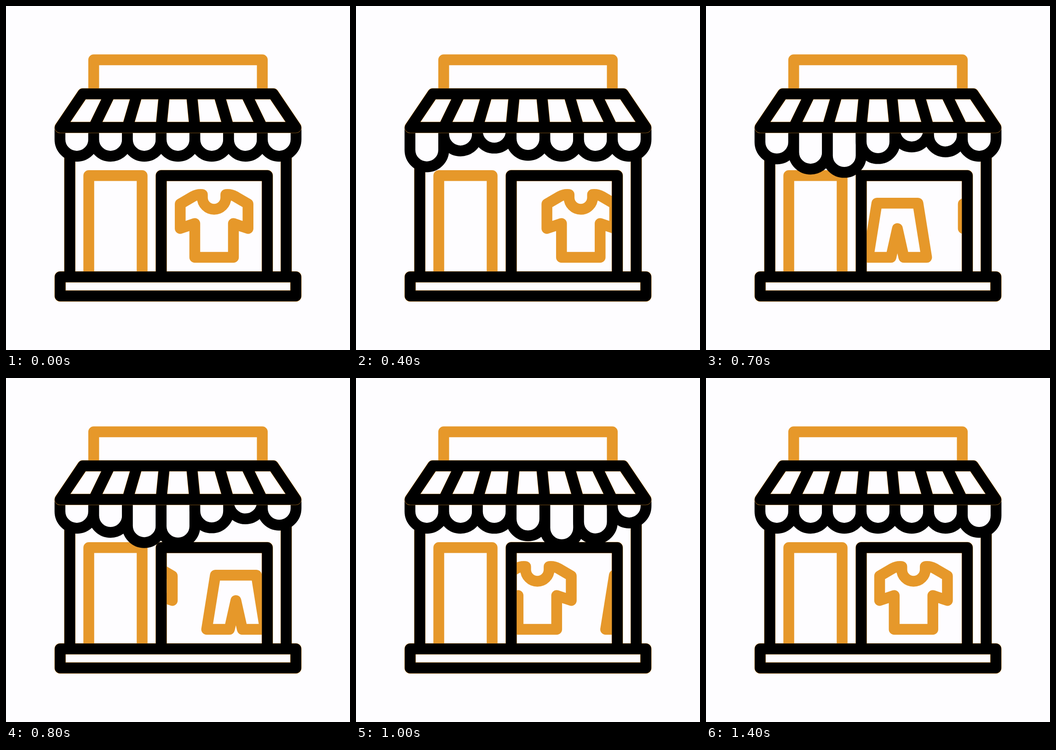
Recreate the animation shown at these times as an HTML page without scripts. Size 748 px wide and 748 px high, loop 1.5 s.

```html
<!DOCTYPE html>
<html lang="en">
<head>
<meta charset="utf-8">
<title>Clothes shop</title>
<style>
  @property --t { syntax: "<number>"; inherits: true; initial-value: 0; }

  html, body { margin: 0; height: 100%; overflow: hidden; background: #fefdff; }

  svg {
    display: block;
    width: 100%;
    height: 100%;
    fill: none;
    stroke-width: 23.5;
    stroke-linejoin: round;
    animation: clock 1500ms steps(15) -20ms infinite;
  }

  /* Clock in milliseconds, ten ticks per second */
  @keyframes clock { to { --t: 1500; } }

  .accent { stroke: #e6982a; }
  .ink { stroke: #000; }
  .fringe { stroke-width: 24.6; }

  /* Closed form of cubic-bezier(2/3, 0, 1/3, 1) */
  .rack {
    --q: calc((var(--t) - 740) / 6000);
    --r: sqrt(var(--q) * var(--q) + 1 / 1728);
    --s: calc(0.5 + pow(var(--r) + var(--q), 1 / 3) - pow(var(--r) - var(--q), 1 / 3));
    transform: translateX(calc(429px * var(--s) * var(--s) * (3 - 2 * var(--s))));
  }

  /* Each scallop lifts, drops and settles, 120 ms after its neighbour */
  .scallop {
    --local: calc(var(--t) - 120 * var(--i));
    --lift: clamp(0, var(--local) / 210, 1);
    --drop: clamp(0, (var(--local) - 210) / 280, 1);
    --settle: clamp(0, (var(--local) - 490) / 280, 1);
    --y: calc(
      -20.5 * var(--lift) * var(--lift) * (3 - 2 * var(--lift))
      + 57.5 * var(--drop) * var(--drop) * (3 - 2 * var(--drop))
      - 37 * var(--settle) * var(--settle) * (3 - 2 * var(--settle)));
    transform: translate(calc(154px + 73.333px * var(--i)), calc(1px * var(--y)));
    fill: #fefdff;
  }
</style>
</head>
<body>
<svg viewBox="0 0 748 748">
  <defs>
    <clipPath id="pane"><path d="M338 369H568V589H338Z"/></clipPath>
    <clipPath id="below-bar"><path d="M0 264H748V748H0Z"/></clipPath>
    <path id="shirt" d="M427 410Q416 409 407 414L378.8 430.5V483.7L410.5 473V546.5H494.5V473L526.2 483.7V430.5L498 414Q489 409 478 410V416.5A25.5 25.5 0 0 1 427 416.5Z"/>
    <path id="shorts" d="M-44.6 428.7H44.6L63.5 546.5H14L0 484L-14 546.5H-63.5Z"/>
    <path id="scallop" d="M-36.67 190V290A36.67 36.67 0 0 0 36.67 290V190"/>
    <path id="walls" d="M138.7 300V589M609.3 300V589M337.5 589V368.7H568.2V589M117.7 589H630.3V630.5H117.7Z"/>
    <path id="awning" d="M117.7 264L167 191H581L630.3 264ZM190.7 264L226.1 191M264 264L285.3 191M337.3 264L344.4 191M410.7 264L403.6 191M484 264L462.7 191M557.3 264L521.9 191"/>
  </defs>

  <g class="accent">
    <path d="M190.7 191V117H557.3V191M180 589V368.7H296V589"/>
    <g clip-path="url(#pane)">
      <g class="rack">
        <use href="#shirt"/>
        <use href="#shorts" x="235.5"/>
        <use href="#shirt" x="-429"/>
      </g>
    </g>
    <use href="#walls" class="fringe"/>
  </g>

  <use href="#walls" class="ink"/>
  <g class="ink" clip-path="url(#below-bar)">
    <use href="#scallop" class="scallop" style="--i:0"/>
    <use href="#scallop" class="scallop" style="--i:1"/>
    <use href="#scallop" class="scallop" style="--i:2"/>
    <use href="#scallop" class="scallop" style="--i:3"/>
    <use href="#scallop" class="scallop" style="--i:4"/>
    <use href="#scallop" class="scallop" style="--i:5"/>
    <use href="#scallop" class="scallop" style="--i:6"/>
  </g>
  <use href="#awning" class="accent fringe"/>
  <use href="#awning" class="ink"/>
</svg>
</body>
</html>
```
